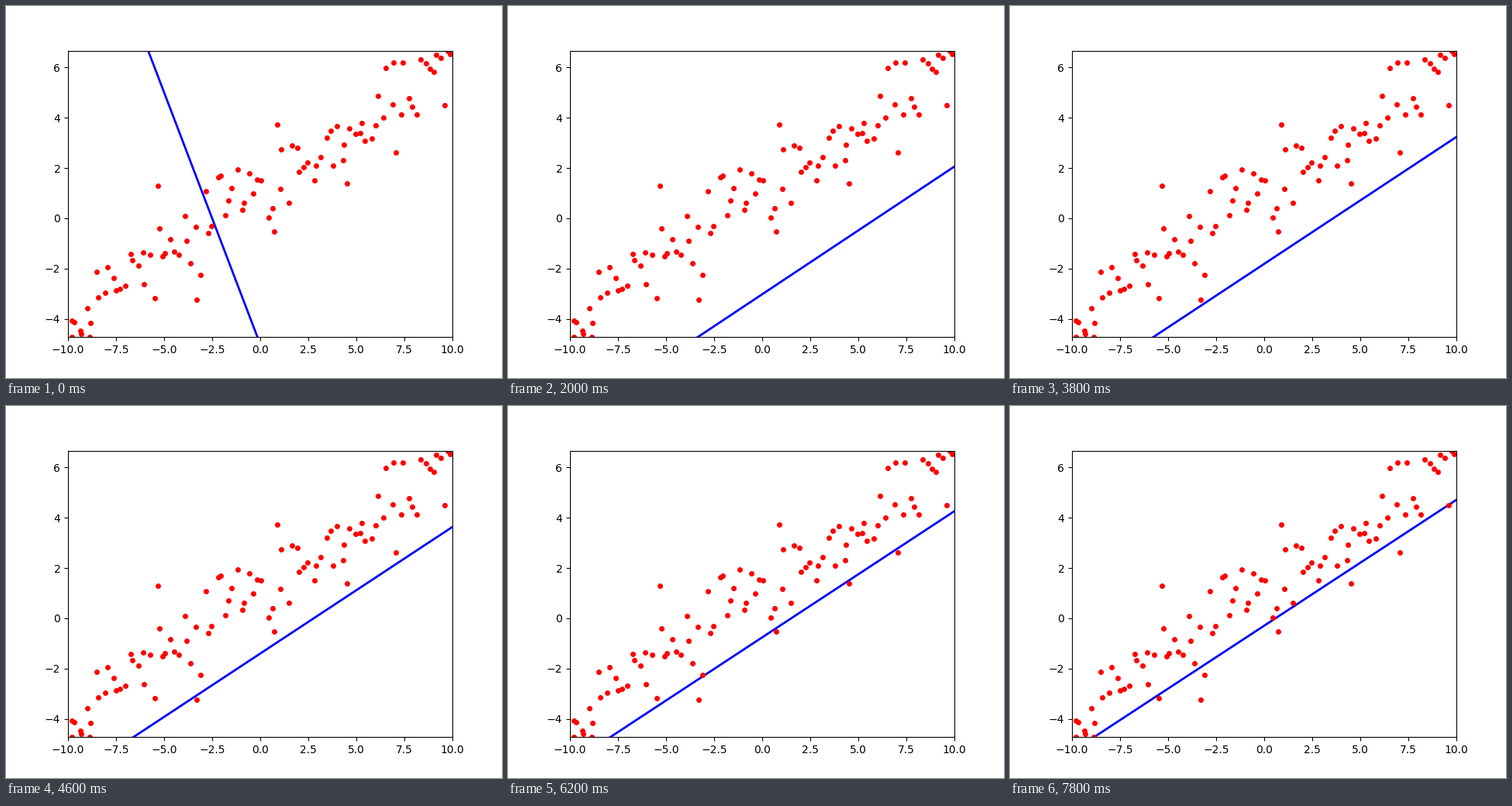
A matplotlib script for the animation above (8000 ms loop, 640 px wide and 480 px high).

```python
import numpy as np
import matplotlib.pyplot as plt
from matplotlib.animation import FuncAnimation

STEPS, INTERVAL = 40, 200
RATE = 0.02
LOW, HIGH = -4.715, 6.66                 # y range of the samples
SLOPE, ICEPT = 0.4965, 0.911             # best fit
MEAN_X, MEAN_XX = 0.094, 34.94           # moments of the sample positions

# The samples that stand out: the extremes and the strays
LANDMARKS = [(-9.8, LOW), (-8.87, LOW), (9.77, HIGH), (-5.32, 1.3),
             (0.89, 3.73), (4.52, 1.39), (6.94, 6.19), (-3.31, -3.23)]


def scatter(count, seed=4):
    """Evenly spread x with jitter, y scattered around the best fit."""
    rng = np.random.default_rng(seed)
    x = -10 + 20 * (np.arange(count) + rng.random(count)) / count
    noise = np.clip(rng.normal(0, 0.95, count), -1.8, 1.8)
    y = SLOPE * x + ICEPT + noise
    # fold back whatever falls outside the range
    y = LOW + abs(y - LOW)
    y = HIGH - abs(HIGH - y)
    return x, y


def descend(slope, icept, steps):
    """Line (slope, intercept) before each step of gradient descent."""
    path = []
    for _ in range(steps):
        path.append((slope, icept))
        ds, di = slope - SLOPE, icept - ICEPT
        slope -= 2 * RATE * (ds * MEAN_XX + di * MEAN_X)
        icept -= 2 * RATE * (ds * MEAN_X + di)
    return path


path = descend(-2.0, -5.0, STEPS)
ends = np.array([-10.0, 10.0])

fig, ax = plt.subplots(figsize=(6.4, 4.8), dpi=100)
line, = ax.plot(ends, ends, color="blue", lw=2)
for x, y in (scatter(100 - len(LANDMARKS)), zip(*LANDMARKS)):
    ax.plot(x, y, "o", color="red", ms=4)
ax.set_xlim(-10, 10)
ax.set_ylim(LOW, HIGH)


def update(i):
    slope, icept = path[i]
    line.set_data(ends, slope * ends + icept)
    return line,


anim = FuncAnimation(fig, update, frames=STEPS, interval=INTERVAL,
                     init_func=lambda: update(0), repeat=True)
plt.show()
```
